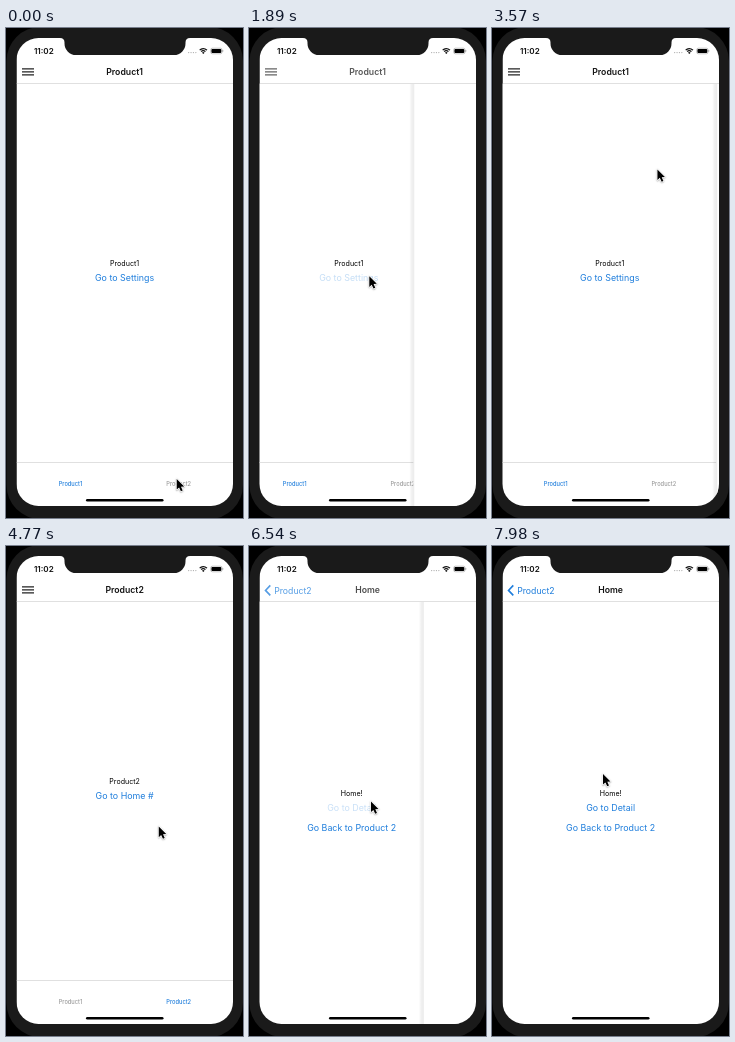
Recreate the animation shown at these times as an HTML page with a canvas. Size 237x490 px, loop 8 s.

```html
<!DOCTYPE html>
<html lang="en">
<head>
<meta charset="utf-8">
<title>Tab and stack navigation</title>
<style>
html, body { margin: 0; width: 100%; height: 100%; overflow: hidden; background: #000; }
canvas { display: block; width: 237px; height: 490px; }
</style>
</head>
<body>
<canvas id="stage"></canvas>
<script>
const W = 237, H = 490, LOOP = 8000;
const MID = 118.6, LEFT = 10.5, SCREEN_W = 216.5, TOP = 10, SCREEN_H = 468;
const BAR_BOTTOM = 56, SLIDE = 500;
const BLUE = '#1f7edc', INK = '#141414', GRAY = '#999', RULE = '#d6d6d6';

const canvas = document.getElementById('stage');
const ctx = canvas.getContext('2d');
const scale = window.devicePixelRatio || 1;
canvas.width = W * scale;
canvas.height = H * scale;

// Each page lists its lines as [text, baseline, is link].
const pages = {
  p1: { title: 'Product1', tab: 0, lines: [['Product1', 238.1], ['Go to Settings', 253.3, true]] },
  p2: { title: 'Product2', tab: 1, lines: [['Product2', 238.1], ['Go to Home #', 253.3, true]] },
  settings: { title: 'Settings', back: 'Product1', lines: [['Settings!', 269.5]] },
  home: {
    title: 'Home', back: 'Product2',
    lines: [['Home!', 249.7], ['Go to Detail', 265.1, true], ['Go Back to Product 2', 284.7, true]]
  },
  detail: { title: 'Detail', back: 'Home', lines: [['Detail!', 269.5]] }
};

const route = [
  { at: 0, page: 'p1' },
  { at: 350, page: 'p2' },
  { at: 1260, page: 'p1' },
  { at: 1850, page: 'settings', move: 'push' },
  { at: 3240, page: 'p1', move: 'pop' },
  { at: 4200, page: 'p2' },
  { at: 5250, page: 'home', move: 'push' },
  { at: 6507, page: 'detail', move: 'push' },
  { at: 7430, page: 'home', move: 'pop' }
];

// Pointer: time, x, y
const pointer = [
  [0, 170.7, 451], [480, 170.7, 451], [950, 66, 451], [1340, 66, 451],
  [1720, 120.3, 248.3], [2480, 120.3, 248.3], [3000, 30, 41], [3280, 30, 41],
  [3570, 165.4, 141], [4000, 171, 451], [4320, 171, 451], [4770, 152.8, 280.7],
  [5050, 121, 251], [5400, 121, 251], [5900, 122, 255.5], [6800, 122, 255.5],
  [7250, 28, 41], [7500, 28, 41], [7980, 111, 228], [8000, 111, 228]
];

const clamp = v => Math.max(0, Math.min(1, v));

function slope(i, axis) {
  const a = pointer[i], b = pointer[i + 1];
  return a && b ? (b[axis] - a[axis]) / (b[0] - a[0]) : 0;
}

function tangent(i, axis) {
  const a = slope(i - 1, axis), b = slope(i, axis);
  return a * b > 0 ? 2 * a * b / (a + b) : 0;
}

function pointerAt(t, axis) {
  let i = 0;
  while (i < pointer.length - 2 && pointer[i + 1][0] <= t) i++;
  const a = pointer[i], b = pointer[i + 1], d = b[0] - a[0];
  const u = (t - a[0]) / d, v = 1 - u;
  return a[axis] * (1 + 2 * u) * v * v + b[axis] * u * u * (3 - 2 * u)
    + d * (tangent(i, axis) * u * v * v - tangent(i + 1, axis) * u * u * v);
}

function write(str, x, y, size, color, weight = 400, align = 'center') {
  ctx.font = `${weight} ${size}px Inter, "Liberation Sans", sans-serif`;
  ctx.textAlign = align;
  ctx.fillStyle = color;
  ctx.fillText(str, x, y);
}

function box(x, y, w, h, color, r = 0) {
  ctx.fillStyle = color;
  ctx.beginPath();
  ctx.roundRect(x, y, w, h, r);
  ctx.fill();
}

function faded(alpha, draw) {
  ctx.save();
  ctx.globalAlpha *= alpha;
  draw();
  ctx.restore();
}

// Opacity of a control that is pressed shortly before `up` and then released
function touch(t, up) {
  const down = clamp((t - up + 110) / 80);
  const u = clamp((t - up) / 250);
  return 1 - 0.8 * down * (1 - u * u * (3 - 2 * u));
}

function linkAlpha(name, index, t) {
  const i = route.findIndex(r => r.move === 'push' && Math.abs(t - r.at) < 300);
  return index === 1 && i > 0 && route[i - 1].page === name ? touch(t, route[i].at) : 1;
}

function backAlpha(name, t) {
  const i = route.findIndex(r => r.move === 'pop' && Math.abs(t - r.at) < 300);
  return i > 0 && route[i - 1].page === name ? touch(t, route[i].at) : 1;
}

function drawBody(name, dx, t) {
  const page = pages[name];
  ctx.save();
  ctx.translate(dx, 0);
  box(LEFT, BAR_BOTTOM, SCREEN_W, 430, '#fff');
  page.lines.forEach(([str, y, link], i) => faded(linkAlpha(name, i, t), () =>
    write(str, MID, y, link ? 8.9 : 7.1, link ? BLUE : '#000')));
  if (page.tab !== undefined) {
    box(LEFT, 434, SCREEN_W, 0.8, RULE);
    ['Product1', 'Product2'].forEach((str, i) =>
      write(str, 64.5 + i * 108.2, 457.7, 5.7, page.tab === i ? BLUE : GRAY, 500));
  }
  ctx.restore();
}

function drawHeader(name, alpha, t) {
  const page = pages[name];
  faded(alpha, () => {
    write(page.title, MID, 47.3, 8.7, INK, 600);
    if (!page.back) {
      for (let i = 0; i < 3; i++) box(16, 40.2 + i * 3, 12, 1.2, '#222');
      return;
    }
    faded(backAlpha(name, t), () => {
      ctx.strokeStyle = BLUE;
      ctx.lineWidth = 1.6;
      ctx.beginPath();
      ctx.moveTo(21.3, 39.4);
      ctx.lineTo(16.5, 44.4);
      ctx.lineTo(21.3, 49.4);
      ctx.stroke();
      write(page.back, 25.2, 47.5, 8.7, BLUE, 400, 'left');
    });
  });
}

function drawNavigation(t) {
  let i = route.length - 1;
  while (route[i].at > t) i--;
  const step = route[i];
  const left = Math.pow(1 - clamp((t - step.at) / SLIDE), 4);
  const moving = step.move && left > 0;

  if (!moving) {
    drawBody(step.page, 0, t);
  } else {
    const push = step.move === 'push';
    const before = route[i - 1].page;
    const p = push ? 1 - left : left;
    const under = push ? before : step.page;
    const over = push ? step.page : before;
    const dx = (1 - p) * SCREEN_W;
    drawBody(under, -0.3 * SCREEN_W * p, t);
    const edge = LEFT + dx;
    const shade = ctx.createLinearGradient(edge - 4, 0, edge + 1, 0);
    shade.addColorStop(0, 'rgba(0,0,0,0)');
    shade.addColorStop(0.5, 'rgba(0,0,0,.06)');
    shade.addColorStop(1, 'rgba(0,0,0,.08)');
    drawBody(over, dx, t);
    box(edge - 4, BAR_BOTTOM, 5, 430, shade);
    box(LEFT, TOP, SCREEN_W, BAR_BOTTOM - TOP, '#fff');
    drawHeader(under, 1 - p, t);
    drawHeader(over, clamp(2 * p - 1), t);
  }
  if (!moving) {
    box(LEFT, TOP, SCREEN_W, BAR_BOTTOM - TOP, '#fff');
    drawHeader(step.page, 1, t);
  }
  box(LEFT, 55.2, SCREEN_W, 0.8, RULE);
}

function drawNotch() {
  ctx.fillStyle = '#1a1a1a';
  ctx.beginPath();
  ctx.moveTo(54, 9);
  ctx.lineTo(54, 10);
  ctx.quadraticCurveTo(58.5, 10, 58.5, 14.5);
  ctx.arcTo(58.5, 27, 71, 27, 11.5);
  ctx.arcTo(179.5, 27, 179.5, 15, 11.5);
  ctx.lineTo(179.5, 14.5);
  ctx.quadraticCurveTo(179.5, 10, 184, 10);
  ctx.lineTo(184, 9);
  ctx.fill();
}

function drawStatus() {
  write('11:02', 37.8, 26, 8.1, '#111', 600);
  for (let i = 0; i < 4; i++) box(182 + i * 2.4, 23.9, 1.3, 1.3, '#aaa', 0.65);
  ctx.strokeStyle = '#111';
  ctx.lineWidth = 1.2;
  for (const r of [2.9, 5]) {
    ctx.beginPath();
    ctx.arc(197.3, 25.6, r, -Math.PI * 0.76, -Math.PI * 0.24);
    ctx.stroke();
  }
  ctx.fillStyle = '#111';
  ctx.beginPath();
  ctx.moveTo(197.3, 26);
  ctx.arc(197.3, 26, 1.8, -Math.PI * 0.76, -Math.PI * 0.24);
  ctx.fill();
  ctx.strokeStyle = '#888';
  ctx.lineWidth = 0.5;
  ctx.beginPath();
  ctx.roundRect(204.7, 20.2, 11.3, 5.6, 1.6);
  ctx.stroke();
  box(205.4, 20.9, 9.9, 4.2, '#000', 1);
  box(216.5, 22.1, 0.7, 1.8, '#888', 0.3);
}

function drawPointer(x, y) {
  ctx.save();
  ctx.translate(x, y);
  ctx.beginPath();
  [[0, 0], [0, 10.6], [2.4, 8.4], [4.2, 12.3], [6, 11.5], [4.3, 7.7], [7.5, 7.5]]
    .forEach(p => ctx.lineTo(...p));
  ctx.closePath();
  ctx.lineJoin = 'round';
  ctx.strokeStyle = '#fff';
  ctx.lineWidth = 1.5;
  ctx.shadowColor = 'rgba(0,0,0,.35)';
  ctx.shadowBlur = 1.5 * scale;
  ctx.shadowOffsetY = 0.6 * scale;
  ctx.stroke();
  ctx.shadowColor = 'transparent';
  ctx.fillStyle = '#000';
  ctx.fill();
  ctx.restore();
}

function render(t) {
  ctx.setTransform(scale, 0, 0, scale, 0, 0);
  box(0, 0, W, H, '#000');
  box(0.5, -1, 236.5, 492, '#1a1a1a', 34);
  ctx.save();
  ctx.beginPath();
  ctx.roundRect(LEFT, TOP, SCREEN_W, SCREEN_H, 22);
  ctx.clip();
  drawNavigation(t);
  drawStatus();
  box(80, 471, 77.5, 2.6, '#000', 1.3);
  ctx.restore();
  drawNotch();
  drawPointer(pointerAt(t, 1), pointerAt(t, 2));
}

const start = performance.now();
function tick() {
  render((performance.now() - start) % LOOP);
  requestAnimationFrame(tick);
}
tick();
</script>
</body>
</html>
```
